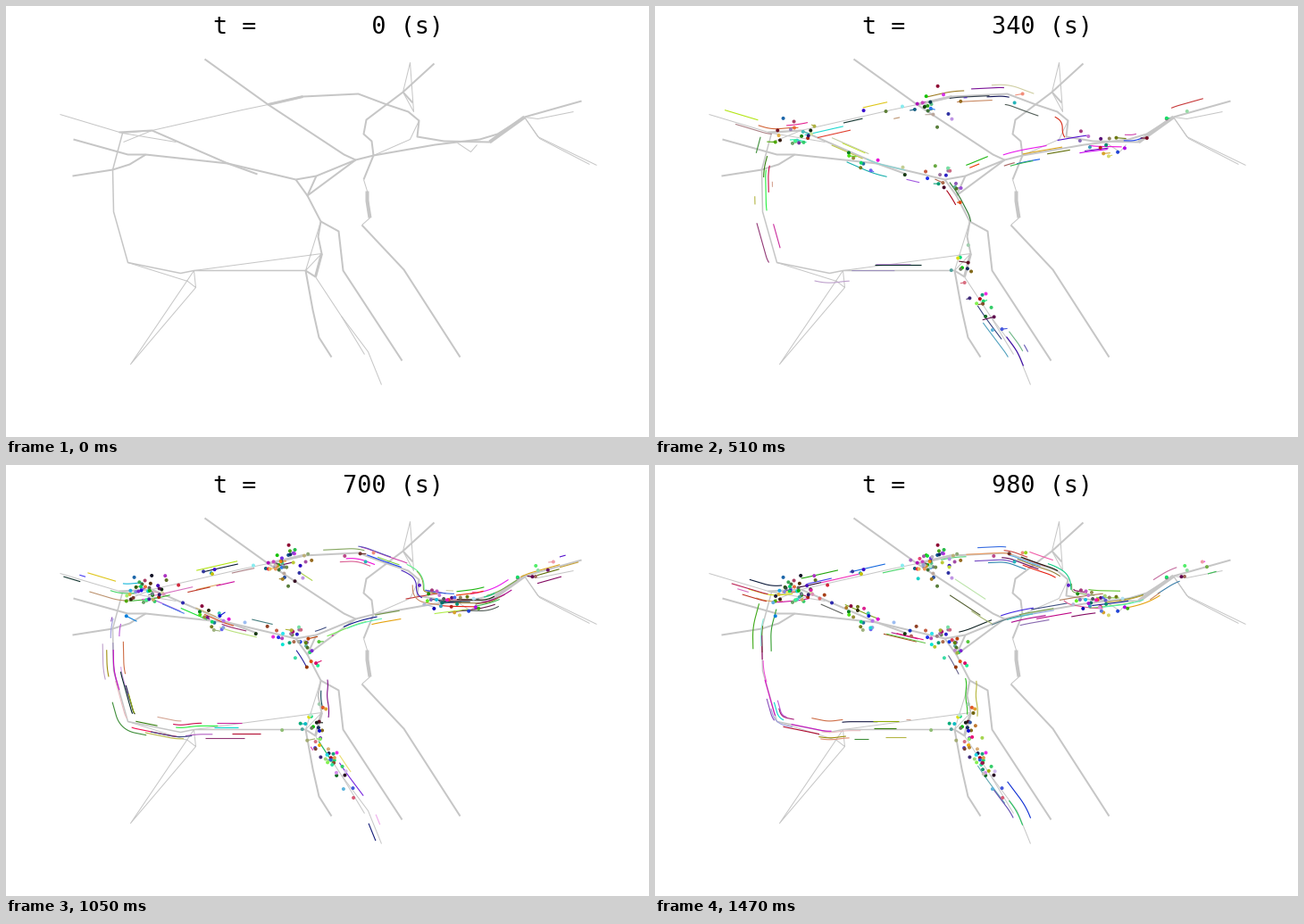
A matplotlib script for the animation above (1500 ms loop, 720x483 px).

```python
import numpy as np
import matplotlib.pyplot as plt
from matplotlib.animation import FuncAnimation
from matplotlib.collections import LineCollection

W, H, DPI = 720, 483, 100
FRAMES, INTERVAL = 50, 30
PX = 72 / DPI
ROAD = "#c6c6c6"
rng = np.random.default_rng(12)

# Roads that carry traffic: width, first departure, key points.
CORRIDORS = [
    (1, 1, "293,110 264,116 163,139 130,142 60,121"),
    (2, 1, "126,141 163,139 248,176 324,194"),
    (1.5, 2, "130,142 119,183 120,230 136,287 195,299 210,296 335,296"),
    (2, 7, "324,194 337,212 352,241 349,258 353,277 346,303"),
    (2, 1, "324,194 347,190 391,172 411,167 480,155 530,149 550,143 580,124 644,106"),
    (2, 1, "293,110 332,101 394,98 426,110 450,118 462,128 460,146 490,151 541,152 580,124"),
    (1, 1, "346,303 375,347 405,387 420,424"),
    (2, 32, "293,110 378,166 391,172"),
]

# Quiet roads: width and key points.
SIDE_ROADS = [
    (1, "136,287 203,308 212,315 139,401 210,296 212,315"),
    (1, "210,296 353,277 335,296 352,241"),
    (1, "375,347 401,390"),
    (1, "400,194 404,207 407,237 398,245"),
    (1, "444,96 452,63 456,118 444,96"),
    (1, "462,128 452,149 411,167"),
    (1, "130,142 190,152"),
    (1, "131,152 163,139"),
    (1, "505,153 520,163 527,155"),
    (1, "635,118 595,126 580,124 597,148 653,177"),
    (1, "580,124 595,146 661,178"),
    (2, "222,59 293,110"),
    (2, "75,149 136,166 156,166 248,176 281,188"),
    (2, "74,190 119,183 138,177 156,166"),
    (2, "391,172 337,212 347,190"),
    (2, "352,241 372,252 377,296 443,397"),
    (2, "346,303 335,296 343,340 350,371 364,393"),
    (2, "479,64 444,96 403,127 400,143 409,151 411,167 400,194"),
    (2, "444,96 455,108"),
    (2, "398,245 445,295 508,393"),
    (3, "293,110 332,101"),
    (3, "353,277 346,303"),
    (4, "404,207 404,218 407,237"),
    (4, "541,152 580,124"),
]

# Hubs where vehicles park: centre and number of dots.
HUBS = {(155, 142): 56, (310, 106): 54, (230, 166): 26, (300, 186): 16,
        (333, 202): 34, (344, 296): 28, (367, 334): 30, (490, 150): 34,
        (595, 122): 10, (395, 98): 5}


def points(text):
    return np.array([p.split(",") for p in text.split()], float)


def smooth_path(text):
    """Resample a polyline every pixel, round its corners, add normals."""
    pts = points(text)
    dist = np.r_[0, np.cumsum(np.hypot(*np.diff(pts, axis=0).T))]
    s = np.arange(0, dist[-1])
    xy = np.column_stack([np.interp(s, dist, pts[:, k]) for k in (0, 1)])
    half = 10
    padded = np.pad(xy, ((half, half), (0, 0)), mode="edge")
    kernel = np.ones(2 * half + 1) / (2 * half + 1)
    xy = np.column_stack([np.convolve(padded[:, k], kernel, "valid") for k in (0, 1)])
    d = np.gradient(xy, axis=0)
    d /= np.hypot(d[:, 0], d[:, 1])[:, None]
    return xy, np.column_stack([-d[:, 1], d[:, 0]])


def rgb():
    return tuple(rng.uniform(0, 0.95, 3))


def make_trips():
    """One trip per few pixels of corridor, spread evenly over the loop."""
    trips = []
    for _, opens, text in CORRIDORS:
        xy, normal = smooth_path(text)
        count = int(len(xy) / 9.5 * (1 - opens / FRAMES))
        for k in range(count):
            path = xy + normal * rng.uniform(-12, 12)
            if rng.random() < 0.35:
                path = path[::-1]
            begin = int(rng.uniform(0, 0.3) * min(len(path), 250))
            end = int(rng.uniform(0.7, 1) * len(path))
            start = opens + (46 - opens) * (k + rng.random()) / count
            trips.append((path[begin:end], start, rng.uniform(7, 10),
                          rng.uniform(25, 54), rgb()))
    return trips


def make_dots():
    """Scatter dots beside the corridors, close to each hub."""
    track = np.vstack([smooth_path(text)[0] for *_, text in CORRIDORS])
    dots = []
    for hub, count in HUBS.items():
        near = np.exp(-np.sum((track - hub) ** 2, axis=1) / (2 * 17 ** 2))
        spots = track[rng.choice(len(track), count, p=near / near.sum())]
        for k, spot in enumerate(spots):
            pos = spot + rng.normal(0, 6.5, 2)
            tail = np.array([rng.choice([-1, 1]) * rng.uniform(6, 14), rng.normal(0, 3)])
            first = 2 + 40 * (k + rng.random()) / count
            leave = first + rng.uniform(8, 20) if rng.random() < 0.1 else FRAMES
            dots.append((pos, tail, rgb(), first, leave))
    return dots


trips, dots = make_trips(), make_dots()

fig = plt.figure(figsize=(W / DPI, H / DPI), dpi=DPI, facecolor="white")
ax = fig.add_axes([0, 0, 1, 1])
ax.set_xlim(-0.5, W - 0.5)
ax.set_ylim(H - 0.5, -0.5)
ax.axis("off")

roads = [(width, text) for width, *_, text in CORRIDORS + SIDE_ROADS]
ax.add_collection(LineCollection([points(text) for _, text in roads], colors=ROAD,
                                 linewidths=[width * PX for width, _ in roads], zorder=1))
trails = LineCollection([], linewidths=1.1 * PX, zorder=2)
ax.add_collection(trails)
marks = ax.scatter([], [], s=(4 * PX) ** 2, linewidths=0, zorder=3)
clock = ax.text(232, 31, "", family="DejaVu Sans Mono", size=26.7 * PX,
                color="black", ha="left", va="baseline", zorder=4)


def update(frame):
    lines, line_colors, spots, spot_colors = [], [], [], []
    for path, start, speed, length, color in trips:
        head = (frame - start) * speed
        a, b = int(max(head - length, 0)), int(min(head, len(path)))
        if b - a > 2:
            lines.append(path[a:b])
            line_colors.append(color)
    for pos, tail, color, first, leave in dots:
        if first <= frame <= leave:
            spots.append(pos)
            spot_colors.append(color)
            fade = 1 - (frame - first) / 5
            if fade > 0.1:
                lines.append(np.array([pos, pos + tail * fade]))
                line_colors.append(color)
    trails.set_segments(lines)
    trails.set_color(line_colors)
    marks.set_offsets(np.array(spots).reshape(-1, 2))
    marks.set_facecolors(spot_colors)
    clock.set_text(f"t = {frame * 20:8d} (s)")
    return trails, marks, clock


anim = FuncAnimation(fig, update, frames=FRAMES, interval=INTERVAL,
                     repeat=True, repeat_delay=0, blit=False)
plt.show()
```
